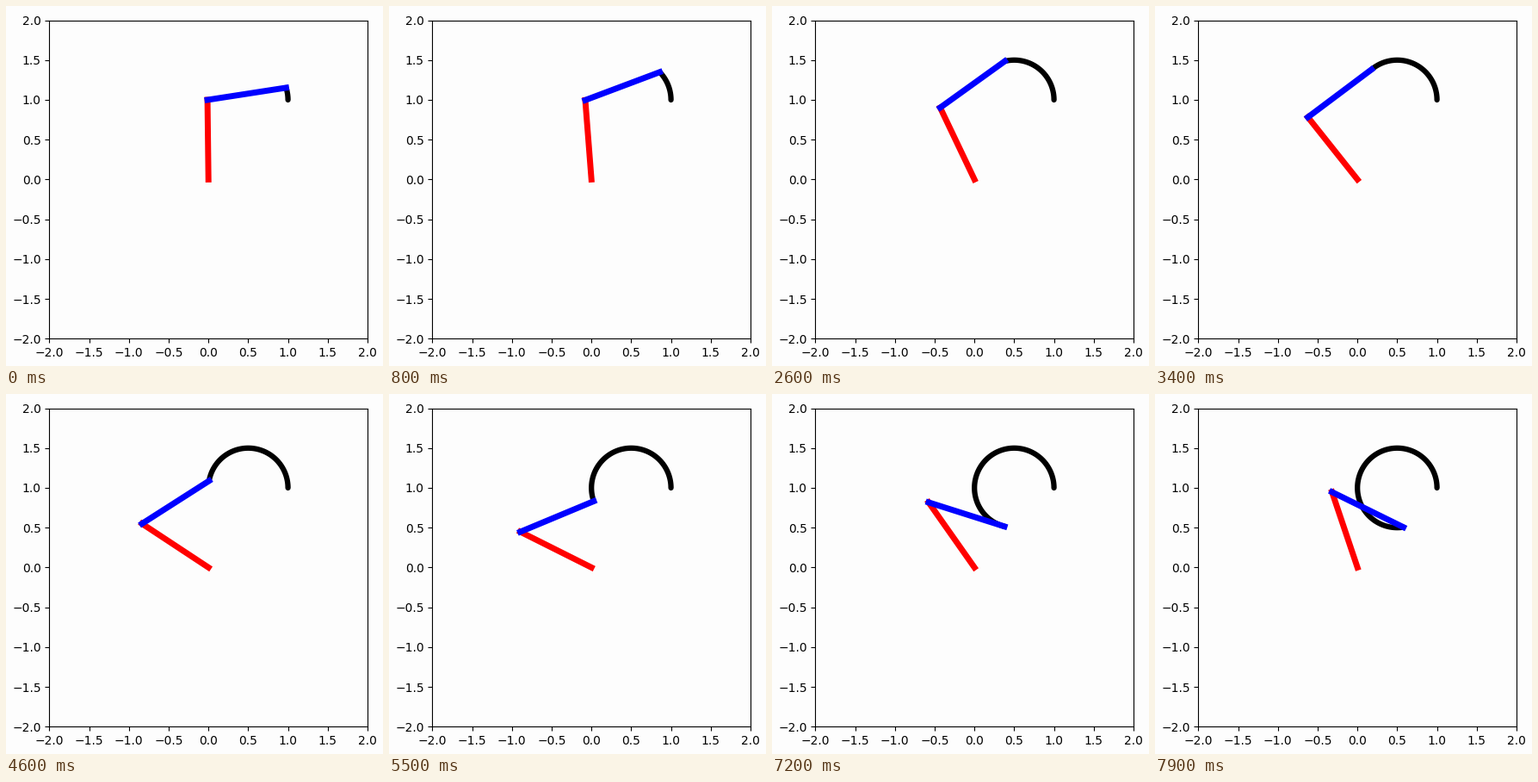
Write a matplotlib script that moves like this. It is 438 px wide and 418 px high and loops after 8000 ms.

```python
import numpy as np
import matplotlib.pyplot as plt
from matplotlib.animation import FuncAnimation

W, H, DPI = 438, 418, 100
FRAMES, INTERVAL = 80, 100
START, STEP = 0.31, 0.0577
PAPER = "#fdfdfd"
CENTER, RADIUS = np.array([0.5, 1.0]), 0.5


def target(angle):
    """Point(s) of the traced circle."""
    return CENTER[0] + RADIUS * np.cos(angle), CENTER[1] + RADIUS * np.sin(angle)


def elbow(x, y):
    """Inverse kinematics for two unit links, elbow on the left."""
    shoulder = np.arctan2(y, x) + np.arccos(np.hypot(x, y) / 2)
    return np.cos(shoulder), np.sin(shoulder)


fig = plt.figure(figsize=(W / DPI, H / DPI), dpi=DPI, facecolor=PAPER)
ax = fig.add_axes([50.4 / W, 31.8 / H, 369.6 / W, 369.6 / H], facecolor=PAPER)
ax.set(xlim=(-2, 2), ylim=(-2, 2))
ax.set_xticks(np.arange(-2, 2.1, 0.5))
ax.set_yticks(np.arange(-2, 2.1, 0.5))

trail, = ax.plot([], [], color="black", lw=4.5, solid_capstyle="round")
upper, = ax.plot([], [], color="red", lw=5)
fore, = ax.plot([], [], color="blue", lw=5)


def update(i):
    angle = START + STEP * i
    x, y = target(angle)
    ex, ey = elbow(x, y)
    trail.set_data(*target(np.linspace(0, angle, 120)))
    upper.set_data([0, ex], [0, ey])
    fore.set_data([ex, x], [ey, y])
    return trail, upper, fore


anim = FuncAnimation(fig, update, frames=FRAMES, interval=INTERVAL,
                     repeat=True, repeat_delay=0)
plt.show()
```
